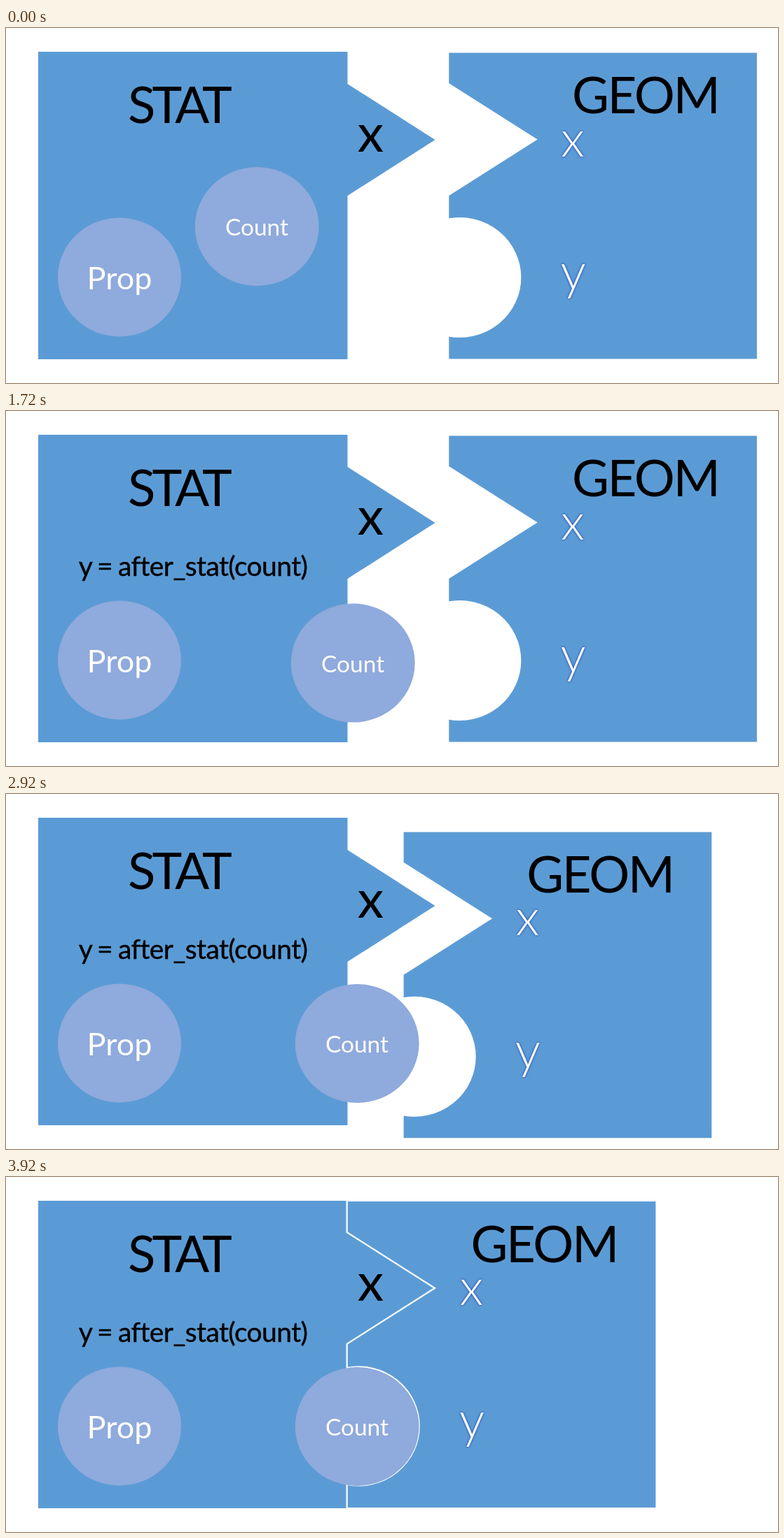
Recreate the animation shown at these times as an HTML page. Size 1102 by 508 pixels, loop 3.96 s.

```html
<!DOCTYPE html>
<html lang="en">
<head>
<meta charset="utf-8">
<title>Stat and geom</title>
<style>
html, body { margin: 0; width: 100%; height: 100%; overflow: hidden; background: #fff; }
svg { display: block; width: 100vw; height: 100vh; }
text { font-family: Lato, "Open Sans", sans-serif; text-anchor: middle; }
.piece { fill: #5b9bd5; }
.bubble { fill: #8faadc; }
.light { fill: #fff; }
.title { font-size: 72.5px; letter-spacing: -2.4px; }
.tight { letter-spacing: -5px; }
.code { font-size: 39px; letter-spacing: -.6px; word-spacing: -1.5px; stroke: #000; stroke-width: .4; }
.glow { fill: #fff; font-size: 72px; font-weight: 300; filter: drop-shadow(0 0 1.6px #2f55b8) drop-shadow(0 0 1px #4472c4); }
</style>
</head>
<body>
<svg viewBox="0 0 1102 508">
  <path class="piece" d="M46 34H487.5V80L612.5 160L487.5 240V474H46Z"/>
  <text class="title tight" x="246" y="136">STAT</text>
  <text x="520.5" y="177" font-size="75">x</text>

  <ellipse class="bubble" cx="162" cy="356.5" rx="88" ry="85"/>
  <text class="light" x="162" y="374" font-size="45">Prop</text>

  <g id="geom">
    <path class="piece" stroke="#fff" stroke-width="2.2"
      d="M631.2 34.5H1073V474.5H631.2V440.4A86.8 84.9 0 1 0 631.2 273.6V239.3L756.6 159.5L631.2 79.7Z"/>
    <text class="title" x="912.7" y="122">GEOM</text>
    <text class="glow" x="809" y="183.5">x</text>
    <text class="glow" x="809.5" y="373.5">y</text>
  </g>

  <g id="count">
    <ellipse class="bubble" cx="358.2" cy="284" rx="88.4" ry="85"/>
    <text class="light" x="358" y="297" font-size="33.5">Count</text>
  </g>

  <text id="code" class="code" x="267" y="236">y = after_stat(count)</text>
</svg>
<script>
const LOOP = 3960, FADE = 400;
const $ = id => document.getElementById(id);

// Each mover follows one Bezier curve between two times
const movers = [
  { el: $("count"), from: 200, to: 1910, curve: [[0, 0], [36, 28], [-54, 78], [86, 112], [143, 73]] },
  { el: $("geom"), from: 2092, to: 3840, curve: [[0, 0], [-36, 36], [-72, 23], [-108, -2], [-144.5, -0.5]] }
];

const clamp = v => Math.min(1, Math.max(0, v));
const ease = u => u < 0.5 ? 2 * u * u : 1 - 2 * (1 - u) ** 2;
const mix = (a, b, w) => a.map((v, i) => v + (b[i] - v) * w);

function bezier(pts, w) {
  while (pts.length > 1) pts = pts.slice(1).map((p, i) => mix(pts[i], p, w));
  return pts[0];
}

function draw(t) {
  for (const { el, from, to, curve } of movers) {
    const w = ease(clamp((t - from) / (to - from)));
    el.setAttribute("transform", `translate(${bezier(curve, w)})`);
  }
  $("code").setAttribute("opacity", clamp(t / FADE));
}

let start;
function tick(now) {
  start ??= now;
  draw(Math.max(0, now - start) % LOOP);
  requestAnimationFrame(tick);
}
draw(0);
requestAnimationFrame(tick);
</script>
</body>
</html>
```
